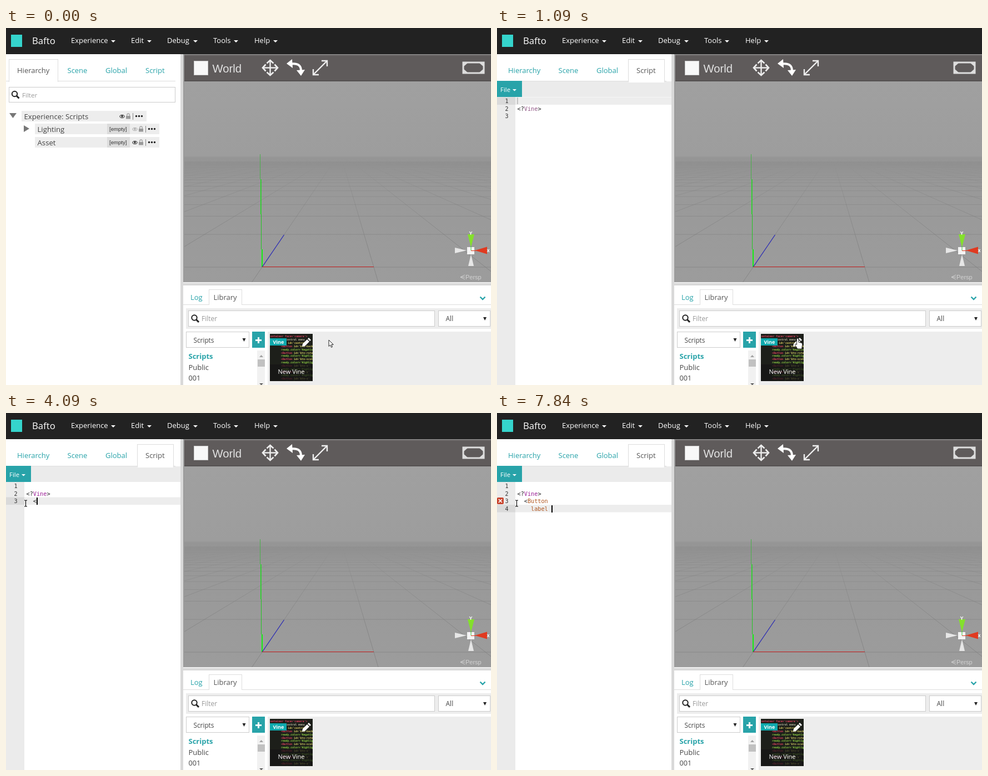
Write an HTML page with a canvas that moves like this. It is 873 px wide and 642 px high and loops after 7.99 s.

```html
<!DOCTYPE html>
<html lang="en">
<head>
<meta charset="utf-8">
<title>Script editor</title>
<style>
  html, body { margin: 0; width: 100%; height: 100%; overflow: hidden; background: #fff; }
  canvas { display: block; }
</style>
</head>
<body>
<canvas id="stage" width="873" height="642"></canvas>
<script>
const ctx = document.getElementById('stage').getContext('2d');
const LOOP = 7990;
const SANS = '"Open Sans", "Noto Sans", sans-serif';
const MONO = '"DejaVu Sans Mono", monospace';
const ARIAL = '"Liberation Sans", Arial, sans-serif';
const TEAL = '#28a3a9', INK = '#333';

// Script text typed into the editor: [time, characters]
const KEYS = [
  [3640, '  '], [4090, '<'], [4390, 'B'], [4540, 'u'], [4690, 't'], [4840, 'to'], [4990, 'n'],
  [5590, '\n  '], [5890, '  '],
  [6490, 'l'], [6640, 'a'], [6790, 'b'], [6940, 'e'], [7090, 'l'], [7840, ' ']
];
const CARET_OFF = [[3040, 3340], [5440, 5590], [7540, 7840]];
const OPEN_SCRIPT = 1090, CLICK_LINE = 2440, SHOW_ERROR = 4390;
const LINE = 13.5, CHAR = 6.15;

function rect(x, y, w, h, fill) {
  ctx.fillStyle = fill;
  ctx.fillRect(x, y, w, h);
}
function box(x, y, w, h, fill, stroke) {
  rect(x, y, w, h, fill);
  ctx.strokeStyle = stroke;
  ctx.lineWidth = 1;
  ctx.strokeRect(x + .5, y + .5, w - 1, h - 1);
}
function text(s, x, y, size, fill, family = SANS, weight = 400) {
  ctx.font = `${weight} ${size}px ${family}`;
  ctx.fillStyle = fill;
  ctx.fillText(s, x, y);
}
function poly(fill, ...p) {
  ctx.beginPath();
  for (let i = 0; i < p.length; i += 2) ctx.lineTo(p[i], p[i + 1]);
  ctx.closePath();
  ctx.fillStyle = fill;
  ctx.fill();
}
function line(color, width, ...p) {
  ctx.beginPath();
  for (let i = 0; i < p.length; i += 2) ctx.lineTo(p[i], p[i + 1]);
  ctx.strokeStyle = color;
  ctx.lineWidth = width;
  ctx.stroke();
}
function disc(x, y, r, fill) {
  ctx.beginPath();
  ctx.arc(x, y, r, 0, 7);
  ctx.fillStyle = fill;
  ctx.fill();
}
function shape(d, x, y, fill, stroke, width = 1) {
  const path = new Path2D(d);
  ctx.save();
  ctx.translate(x, y);
  if (fill) { ctx.fillStyle = fill; ctx.fill(path); }
  if (stroke) { ctx.strokeStyle = stroke; ctx.lineWidth = width; ctx.stroke(path); }
  ctx.restore();
}
const caretDown = (x, y, r, fill) => poly(fill, x - r, y, x + r, y, x, y + r);

function magnifier(x, y) {
  ctx.beginPath();
  ctx.arc(x, y, 4.7, 0, 7);
  ctx.strokeStyle = '#222';
  ctx.lineWidth = 2;
  ctx.stroke();
  line('#222', 3, x + 3.5, y + 3.5, x + 8, y + 8);
}

function header() {
  rect(0, 0, 873, 46, '#222');
  rect(0, 46, 873, 1, '#151515');
  rect(9, 12, 20, 22, '#35d4cc');
  text('Bafto', 47, 29, 16.7, '#fff');
  [['Experience', 117, 193], ['Edit', 225, 258], ['Debug', 290, 341], ['Tools', 373, 414], ['Help', 447, 485]]
    .forEach(([name, x, arrow]) => {
      text(name, x, 27, 13, '#fff');
      caretDown(arrow, 22, 4, '#fff');
    });
}

function tabs(active) {
  rect(0, 95, 305, 1, '#ddd');
  [['Hierarchy', 20, 5, 89], ['Scene', 110.5], ['Global', 179], ['Script', 251, 236, 66]]
    .forEach(([name, x, left, width]) => {
      if (name === active) {
        box(left, 56, width, 41, '#fff', '#ddd');
        rect(left + 1, 95, width - 2, 3, '#fff');
      }
      text(name, x, 81, 13, name === active ? '#555' : TEAL);
    });
}

function treeRow(label, x, y, width, badge, eye) {
  rect(x, y, width, 19, '#ededed');
  text(label, x + 4.5, y + 14.5, 13.2, '#444');
  const right = x + width, mid = y + 10;
  if (badge) {
    rect(right - 94, y, 41, 19, '#dcdcdc');
    text('[empty]', right - 90, y + 13, 9.6, INK, ARIAL);
  }
  ctx.beginPath();
  ctx.ellipse(right - 44, mid, 4.1, 2.6, 0, 0, 7);
  ctx.strokeStyle = eye;
  ctx.lineWidth = 1;
  ctx.stroke();
  disc(right - 44, mid - .3, 1.7, eye);
  rect(right - 37, mid - 1, 8, 5.5, '#999');
  shape('M-2.2 0V-2a2.2 2.2 0 0 1 4.4 0V0', right - 33, mid - 1, null, '#999', 1.2);
  rect(right - 25, y + 4, 1, 12, '#888');
  for (let i = 0; i < 3; i++) disc(right - 18.5 + i * 5, mid - .5, 1.7, '#222');
}

function hierarchy() {
  tabs('Hierarchy');
  box(5, 106, 300, 28, '#fff', '#ccc');
  magnifier(15.5, 118.5);
  text('Filter', 29, 125, 11.6, '#999');
  poly('#777', 6, 153, 19, 153, 12.5, 162);
  poly('#777', 32, 175, 42, 181, 32, 187);
  treeRow('Experience: Scripts', 28, 149, 225, false, '#222');
  treeRow('Lighting', 52, 172, 224, true, '#aaa');
  treeRow('Asset', 52, 196, 224, true, '#222');
}

function editor(t) {
  const code = KEYS.filter(k => k[0] <= t).map(k => k[1]).join('').split('\n');
  const clicked = t >= CLICK_LINE;
  const activeRow = clicked ? 1 + code.length : 0;
  const rows = Math.max(3, activeRow + 1);

  rect(0, 96, 314, 28, '#ebebeb');
  tabs('Script');
  rect(0, 95, 45, 29, TEAL);
  text('File', 6, 115, 11.4, '#fff');
  caretDown(31.5, 110, 3.5, '#fff');

  rect(0, 124, 33, 518, '#ebebeb');
  rect(0, 124.5 + activeRow * LINE, 33, LINE, '#dadada');
  rect(33, 124.5 + activeRow * LINE, 281, LINE, '#ededed');
  for (let i = 0; i < rows; i++) text(i + 1, 14.5, 135 + i * LINE, 10.2, INK, MONO);

  const write = (s, row, col, fill) => text(s, 36.5 + col * CHAR, 135 + row * LINE, 10.2, fill, MONO);
  write('<?', 1, 0, '#222');
  write('Vine', 1, 2, clicked ? '#9b1f96' : '#905585');
  write('>', 1, 6, '#222');
  write(code[0].slice(0, 3), 2, 0, '#222');
  write(code[0].slice(3), 2, 3, '#b0561f');
  if (code[1]) write(code[1], 3, 0, '#b0561f');

  if (t >= SHOW_ERROR) {
    ctx.beginPath();
    ctx.roundRect(0, 152, 12, 12, 2);
    ctx.fillStyle = '#c9462f';
    ctx.fill();
    line('#fff', 1.7, 3, 155, 9, 161);
    line('#fff', 1.7, 9, 155, 3, 161);
  }
  if (!clicked) rect(36.5, 125, 1, 12, '#999');
  else if (!CARET_OFF.some(([from, to]) => t >= from && t < to)) {
    const col = code[code.length - 1].length;
    rect(Math.round(36.3 + col * CHAR), 125 + Math.round(activeRow * LINE), 2, 13, '#000');
  }
}

function sceneToolbar() {
  rect(321, 48, 552, 48, '#5f5b5b');
  rect(321, 48, 552, 2, '#6d6969');
  rect(321, 94, 552, 2, '#555252');
  box(338, 59, 26, 26, '#f8f8f8', '#ccc');
  text('World', 371.5, 80, 20.3, '#e2e2e2', ARIAL);

  for (let i = 0; i < 4; i++) {
    ctx.save();
    ctx.translate(475.5, 71.5);
    ctx.rotate(i * Math.PI / 2);
    line('#eee', 2.4, 0, 0, 0, -12);
    line('#eee', 2.6, -6, -8, 0, -13.5, 6, -8);
    ctx.restore();
  }
  shape('M513 64.5Q531 62 531 77', 0, 0, null, '#fff', 4);
  poly('#fff', 505, 64, 515, 56, 516, 72);
  poly('#fff', 523, 76, 538, 75, 531, 86);
  line('#eee', 2.4, 554, 83, 577, 60);
  line('#eee', 2.4, 568, 59, 578, 59, 578, 69);
  line('#eee', 2.4, 553, 74, 553, 84, 563, 84);

  ctx.strokeStyle = '#ddd';
  ctx.lineWidth = 3;
  ctx.strokeRect(823, 62, 37, 19);
  for (const sx of [-1, 1]) for (const sy of [-1, 1]) {
    const x = 841.5 + sx * 18, y = 71.5 + sy * 9;
    poly('#ddd', x, y, x - sx * 8, y, x, y - sy * 7);
  }
}

function floorGrid() {
  // One cell is 201 px wide at the origin row
  const vx = 601, vy = 224, depth = 206;
  ctx.save();
  ctx.beginPath();
  ctx.rect(321, 232, 552, 225);
  ctx.clip();
  const fade = ctx.createLinearGradient(0, 240, 0, 400);
  fade.addColorStop(0, 'rgba(125,125,125,0)');
  fade.addColorStop(.4, 'rgba(125,125,125,.4)');
  fade.addColorStop(1, 'rgba(125,125,125,.7)');
  for (let k = -10; k <= 11; k++)
    line(fade, 1, vx, vy, vx + (461 + 201 * k - vx) * 1.2, vy + depth * 1.2);
  for (let n = 0; n < 30; n++) {
    const y = vy + depth / (1 + .4 * n);
    line(`rgba(125,125,125,${.6 / (1 + n * .12)})`, 1, 321, y, 873, y);
  }
  ctx.restore();
}

function axes() {
  rect(457, 227, 1, 45, '#4bb04b');
  rect(458, 272, 1.6, 63, '#22d822');
  rect(459, 335, 1, 63, '#22c822');
  rect(460, 398, 2, 32, '#12f012');
  line('#2a2ab8', 1.3, 461, 430, 500.5, 372);
  rect(461, 429, 201, 1, '#c42222');
}

function gizmo() {
  poly('#e6e6e6', 808, 395, 808, 405, 829, 400);
  poly('#e6e6e6', 832, 428, 842, 428, 837, 407);
  poly('#e03a20', 866, 393.5, 866, 406.5, 844, 400);
  poly('#84e02c', 831, 371, 843, 371, 837, 394);
  rect(830, 394, 13, 13, '#f4f4f4');
  line('#3fc43f', 1, 837, 392, 837, 400);
  line('#e03a20', 1, 837, 400.5, 846, 400.5);
  text('Y', 833.5, 372, 9, '#fff', ARIAL, 700);
  text('x', 865.5, 403, 9, '#fff', ARIAL, 700);
  line('#d2d2d2', 1, 826, 444, 818, 448, 826, 452);
  line('#d2d2d2', 1, 818, 448, 826, 448);
  text('Persp', 827, 452, 11, '#d2d2d2', ARIAL);
}

function viewport() {
  rect(314, 47, 5, 595, '#d9d9d9');
  rect(319, 47, 554, 412, '#9a9a9a');
  const sky = ctx.createLinearGradient(0, 96, 0, 457);
  sky.addColorStop(0, '#a0a0a0');
  sky.addColorStop(.37, '#9d9d9d');
  sky.addColorStop(.38, '#959595');
  sky.addColorStop(.55, '#999');
  sky.addColorStop(1, '#9c9c9c');
  rect(321, 96, 552, 361, sky);
  floorGrid();
  axes();
  gizmo();
  sceneToolbar();
  rect(319, 457, 554, 2, '#eee');
  rect(319, 459, 554, 4, '#d9d9d9');
}

function thumbnail() {
  rect(475, 550, 77, 85, '#1d1f1a');
  ctx.save();
  ctx.beginPath();
  ctx.rect(475, 550, 77, 85);
  ctx.clip();
  text("ontainer face='camera'>", 476, 556, 4.8, '#e0405f', MONO, 700);
  text('// for control menu', 483, 562, 4.8, '#c4c4ac', MONO, 700);
  text("ption id='controls'", 490, 568, 4.8, '#e0d060', MONO, 700);
  ['back', 'rotate', 'scale', 'x', 'y', 'z'].forEach((id, i) => {
    const y = 574 + i * 11.6;
    text('<Button', 495, y, 4.8, '#e0405f', MONO, 700);
    text(`id='btn-${id}'`, 518, y, 4.8, '#d4cc66', MONO, 700);
    text(i ? "ready.color='Highlight'" : "ready.color='Negative'", 495, y + 5.8, 4.8, '#8fd044', MONO, 700);
  });
  rect(475, 605, 77, 30, 'rgba(20,20,20,.7)');
  ctx.restore();
  rect(475, 558, 30, 13, '#0fa9ad');
  text('Vine', 480.5, 568, 9, '#fff', SANS, 700);
  text('New Vine', 489.5, 622, 11, '#fff');
  poly('#fff', 533, 573, 534, 568, 542, 560, 546, 564, 538, 572);
  poly('#fff', 543, 559, 545, 557, 549, 561, 547, 563);
}

function library() {
  rect(319, 463, 554, 179, '#fff');
  rect(319, 497, 554, 1, '#ddd');
  box(365, 470, 60, 28, '#fff', '#ddd');
  rect(366, 496, 58, 2, '#fff');
  text('Log', 332, 489, 13, TEAL);
  text('Library', 373.5, 489, 13, '#555');
  line(TEAL, 2.4, 853.5, 483.5, 858, 488, 862.5, 483.5);

  rect(324, 504, 549, 37, '#ededed');
  box(328, 508, 444, 29, '#fff', '#ccc');
  magnifier(339, 521);
  text('Filter', 352, 527, 12, '#999');
  box(778, 508, 94, 29, '#fff', '#ccc');
  text('All', 791.5, 527, 12, '#444');
  poly('#222', 859, 520, 865, 520, 862, 526);

  rect(471, 546, 402, 96, '#ededed');
  box(324, 546, 114, 29, '#fff', '#ccc');
  text('Scripts', 337.5, 566, 11.8, '#444');
  poly('#222', 425.5, 558, 431.5, 558, 428.5, 564);
  rect(443, 546, 23, 29, TEAL);
  rect(449, 560, 11, 3, '#fff');
  rect(453, 556, 3, 11, '#fff');

  text('Scripts', 328.5, 595, 13, TEAL, SANS, 700);
  text('Public', 328.5, 615, 13, '#444');
  text('001', 328.5, 634, 12.6, '#444');
  rect(452, 580, 14, 62, '#f1f1f1');
  rect(453, 596, 13, 13, '#c1c1c1');
  poly('#a3a3a3', 456, 592, 463, 592, 459.5, 588);
  poly('#505050', 456, 639, 463, 639, 459.5, 642);
  thumbnail();
}

function tooltip() {
  ctx.beginPath();
  ctx.roundRect(468, 507, 91, 32, 3);
  ctx.fillStyle = '#222';
  ctx.fill();
  poly('#222', 507, 539, 520, 539, 513.5, 545);
  text('New Vine', 487.5, 528, 11.7, '#fff');
}

// Pointer position, moving in 150 ms steps
function pointerAt(t) {
  const progress = (start, steps) =>
    Math.max(0, Math.min(1, (Math.floor((t - start) / 150) + 1) / steps));
  if (t < 1540) {
    const p = progress(300, 3);
    return [581 - 40 * p, 561 - 3 * p];
  }
  const p = progress(1540, 6), e = p * p * (3 - 2 * p), q = 1 - e;
  return [q * q * 541 + 2 * q * e * 210 + e * e * 35.5, q * q * 558 + 2 * q * e * 420 + e * e * 162.5];
}

function pointer(t) {
  const [x, y] = pointerAt(t);
  if (t >= 750 && t < OPEN_SCRIPT) disc(542.5, 560.5, 10.5, 'rgba(225,205,20,.78)');
  if (t >= CLICK_LINE && t < 2590) disc(34, 162, 11, 'rgba(245,225,30,.7)');
  if (x < 314 && t > OPEN_SCRIPT)
    shape('M-2.5-5.5H-1L0-4.7 1-5.5H2.5M0-5V5M-2.5 5.5H-1L0 4.7 1 5.5H2.5', x, y, null, '#000', 1.1);
  else if (x < 552 && x > 475 && y > 550)
    shape('M-1.5 1Q0-1 1.8 1V7L7 8.2Q9 9 8.7 11.5L7.5 19H0L-4.2 12.5Q-5 10-3 10.3L-1.5 11.5Z',
      x, y, '#fff', '#222', .9);
  else
    shape('M0 0V11.5L2.7 9 4.6 13.3 6.5 12.5 4.7 8.3H8.3Z', x, y, '#fff', '#222', 1);
}

function draw(t) {
  rect(0, 0, 873, 642, '#fff');
  header();
  if (t < OPEN_SCRIPT) hierarchy(); else editor(t);
  viewport();
  library();
  if (t >= 450 && t < OPEN_SCRIPT) tooltip();
  pointer(t);
}

function frame() {
  draw(performance.now() % LOOP);
  requestAnimationFrame(frame);
}
frame();
</script>
</body>
</html>
```
